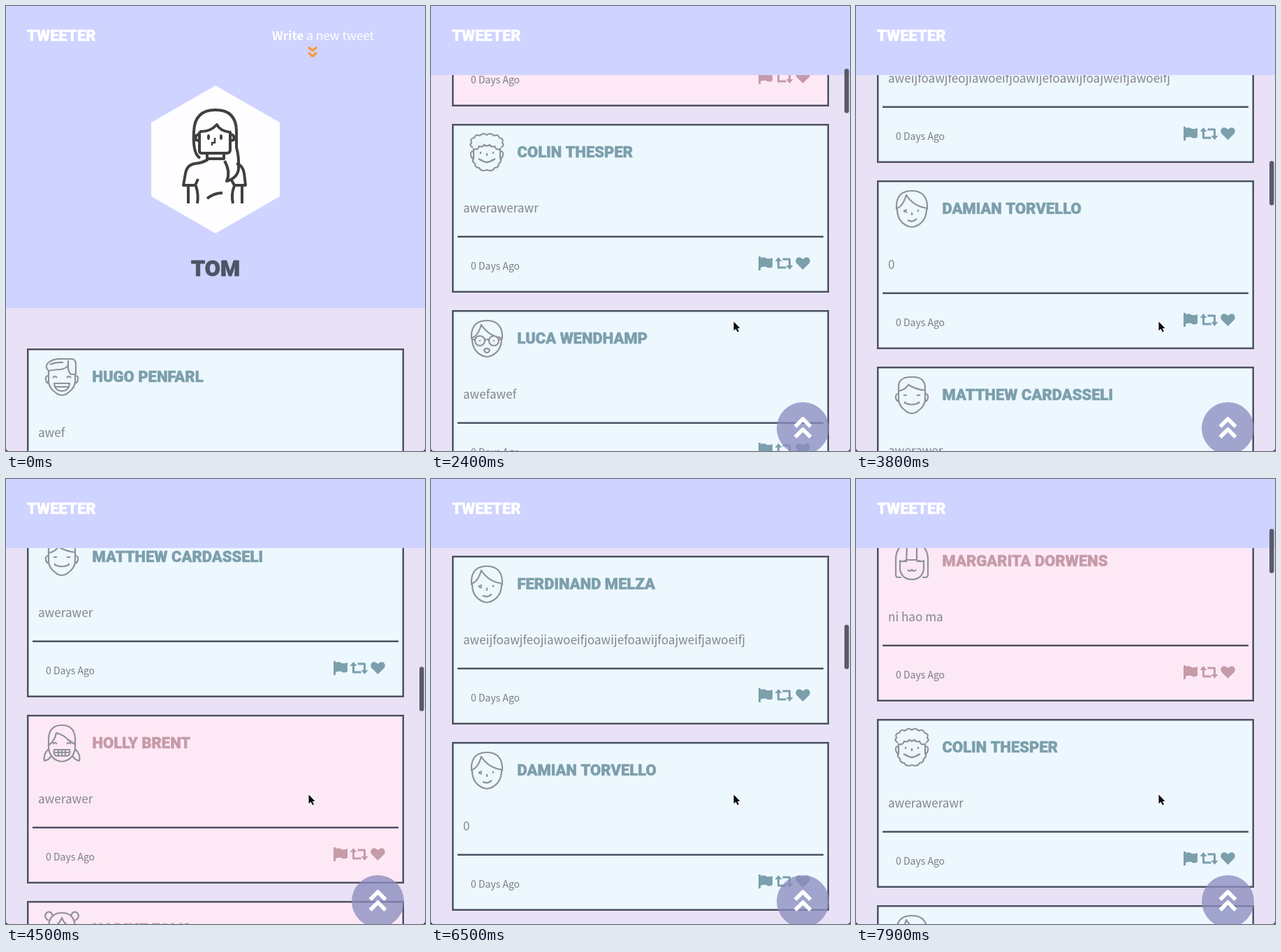
Animation, 600 px wide and 638 px high, one loop 8000 ms. Source, as an HTML page with a canvas:

```html
<!DOCTYPE html>
<html lang="en">
<head>
<meta charset="utf-8">
<title>Tweeter</title>
<style>
html, body { margin: 0; width: 100%; height: 100%; overflow: hidden; background: #e9e1f5; }
canvas { display: block; width: 600px; height: 638px; }
</style>
</head>
<body>
<canvas id="stage"></canvas>
<script>
const W = 600, H = 638, LOOP = 8000, STEP = 100;
const NAV = 99, HERO = 433, FIRST = 491, PITCH = 267, CARD_H = 242;
const canvas = document.getElementById('stage');
const ctx = canvas.getContext('2d');
const dpr = window.devicePixelRatio || 1;
canvas.width = W * dpr;
canvas.height = H * dpr;

const DISPLAY = 'Roboto, "Open Sans", sans-serif';
const BODY = '"Noto Sans CJK JP", "Noto Sans CJK SC", "Noto Sans CJK", "Open Sans", sans-serif';
const INK = '#4c5262';
const BLUE = { fill: '#edf7fe', main: '#7c9fac' };
const PINK = { fill: '#fde9f5', main: '#c69ba8' };

const cards = [
  ['HUGO PENFARL', 'awef', BLUE, 'laugh'],
  ['MARGARITA DORWENS', 'ni hao ma', PINK, 'bob'],
  ['COLIN THESPER', 'awerawerawr', BLUE, 'curly'],
  ['LUCA WENDHAMP', 'awefawef', BLUE, 'glasses'],
  ['ROGER TAMWELL', 'awefawef', BLUE, 'smirk'],
  ['MONICA VELDA', 'awefawefawef', PINK, 'pigtails'],
  ['FERDINAND MELZA', 'aweijfoawjfeojiawoeifjoawijefoawijfoajweifjawoeifj', BLUE, 'wink'],
  ['DAMIAN TORVELLO', '0', BLUE, 'wink'],
  ['MATTHEW CARDASSELI', 'awerawer', BLUE, 'smirk'],
  ['HOLLY BRENT', 'awerawer', PINK, 'pigtails'],
  ['NADINE FOLK', 'awerawer', PINK, 'buns']
];

// Face parts, drawn around the middle of the avatar
const JAW = 'M-19 -5V7Q-18 14 -13 19L-7 24Q0 28 7 24L13 19Q18 14 19 7V-5';
const EARS = 'M-19 -2Q-24 -2 -23 4Q-22 9 -18 9M19 -2Q24 -2 23 4Q22 9 18 9';
const HAPPY = 'M-13 1Q-10 -3 -7 1M7 1Q10 -3 13 1';
const SIDE = 'M-22 1V-7Q-20 -26 0 -26Q20 -26 22 -6V1M-22 -1Q-13 -3 -8 -20Q2 -4 22 -1';
const OVAL = 'M-21 0Q-21 16 -9 23Q0 29 9 23Q21 16 21 0';
const GRIN = 'M-11 9H11Q13 18 6 18H-6Q-13 18 -11 9ZM-10 13H10M-5 9V18M0 9V18M5 9V18';
const FRINGE = 'M-18 2Q-10 -4 -8 -15Q3 -12 9 -5Q14 -2 18 1';
const EYE = 'M-9 -1V2M9 -1V2';

const faces = {
  laugh: JAW + EARS + HAPPY +
    'M-19 -4V-9Q-25 -15 -20 -20Q-13 -27 2 -26H15Q20 -25 20 -18V-4' +
    'M-19 -9Q-8 -11 -2 -11Q6 -12 9 -17M9 -24V-12Q10 -6 13 -4H19M-17 -18Q-8 -22 2 -21' +
    'M-11 9H11Q10 20 0 20Q-10 20 -11 9ZM-10 14H10',
  bob: 'M-15 23H-20Q-23 23 -23 19V-4Q-22 -26 0 -26Q22 -26 23 -4V19Q23 23 20 23H15' +
    'M-17 -2V12Q-14 26 0 26Q14 26 17 12V-2M-17 0H-8L-7 -22M-7 -2H7L7 -22M8 0H17' +
    HAPPY + 'M-6 12Q-3 16 0 12Q3 16 6 12',
  curly: 'M-20 -7Q-26 -10 -22 -14Q-25 -20 -18 -21Q-16 -27 -10 -24Q-5 -29 0 -25Q5 -29 10 -24Q16 -27 18 -21Q25 -20 22 -14Q26 -10 20 -7' +
    'M-18 -5Q-13 -3 -11 -9Q-6 -7 -4 -11Q0 -8 4 -11Q6 -7 11 -9Q13 -3 18 -5' +
    'M-19 -6V7Q-22 13 -17 16Q-17 22 -11 22Q-8 28 0 25Q8 28 11 22Q17 22 17 16Q22 13 19 7V-6' +
    EARS + EYE + 'M-9 10Q0 18 9 10M-12 9L-7 12M12 9L7 12M0 1V5',
  glasses: SIDE + OVAL + 'M-17 3a7 7 0 1 0 14 0a7 7 0 1 0 -14 0M3 3a7 7 0 1 0 14 0a7 7 0 1 0 -14 0' +
    'M-3 2Q0 0 3 2M-21 1H-17M17 1H21M-10 2V4M10 2V4M-4 16Q0 12 4 16Q3 20 0 20Q-3 20 -4 16Z',
  pigtails: 'M-19 8V-7Q-18 -26 0 -26Q18 -26 19 -7V8Q15 25 0 26Q-15 25 -19 8' + FRINGE + HAPPY + GRIN +
    'M-19 8Q-27 16 -25 25Q-18 24 -15 17M19 8Q27 16 25 25Q18 24 15 17',
  wink: SIDE + OVAL + 'M-12 3L-7 1M-12 3L-7 5M9 1V4M0 5V9M-6 16Q1 20 7 14',
  smirk: JAW + EARS + 'M-19 -4V-10Q-20 -26 -2 -26H4Q19 -25 19 -10V-4M-19 -6Q-9 -8 -5 -15Q6 -8 19 -7' +
    'M-12 0H-7M7 0H12M-10 11Q0 16 10 11M-10 9V12M10 9V12',
  buns: JAW + 'M-19 -4Q-18 -24 0 -24Q18 -24 19 -4M-18 -2Q-4 -5 0 -17Q4 -5 18 -2' +
    'M-13 -20Q-16 -28 -22 -24Q-27 -18 -19 -13M13 -20Q16 -28 22 -24Q27 -18 19 -13' + EYE + 'M-7 12Q0 18 7 12'
};

const portrait = 'M278 218Q267 212 269 180Q270 149 300 149Q330 149 330 180V203Q334 216 333 234Q331 247 316 251Q322 238 313 222' +
  'M277 180V208Q277 211 281 211H316Q321 211 321 206V181Q306 179 302 170Q292 181 277 180' +
  'M276 184Q270 185 272 192L276 193M322 184Q328 185 326 192L322 193' +
  'M288 211V219H312V211M289 220Q282 225 270 226Q259 228 257 240L254 257H271L275 248' +
  'M330 226Q339 228 341 240L343 257H327L322 248' +
  'M261 258V283M272 258Q276 270 274 283M338 258V283M327 258Q322 270 325 283' +
  'M288 276Q298 268 310 268';

const flag = 'M-11 -10H-8V-8Q-3 -10 1 -7Q5 -6 9 -8V5Q4 8 0 5Q-4 4 -8 6V10H-11Z';
const heart = 'M0 9L-9 0Q-12 -5 -8 -8Q-4 -10 0 -6Q4 -10 8 -8Q12 -5 9 0Z';
const repost = 'M-8 -6V6H3M-2 -6H8V6';
const repostTips = 'M-13 -3H-3L-8 -9ZM3 3H13L8 9Z';

// Scroll position over time
const keys = [[0, 0], [900, 192], [1200, 325], [1800, 590], [2400, 856], [3200, 1626],
  [4500, 2556], [5000, 2690], [6500, 1983], [7900, 681]];

function secant(i) {
  return (keys[i + 1][1] - keys[i][1]) / (keys[i + 1][0] - keys[i][0]);
}

function slope(i) {
  if (i === 0) return secant(0);
  if (i === keys.length - 1) return secant(i - 1);
  const a = secant(i - 1), b = secant(i);
  return a * b < 0 ? 0 : (a + b) / 2;
}

function scrollAt(t) {
  let i = 0;
  while (i < keys.length - 2 && t >= keys[i + 1][0]) i++;
  const [t0, a] = keys[i], [t1, b] = keys[i + 1];
  const d = t1 - t0, u = (t - t0) / d, v = 1 - u;
  return a * v * v * (1 + 2 * u) + b * u * u * (3 - 2 * u) +
    d * u * v * (slope(i) * v - slope(i + 1) * u);
}

function rect(x, y, w, h, color) {
  ctx.fillStyle = color;
  ctx.fillRect(x, y, w, h);
}

function text(str, x, y, font, color, align = 'left') {
  ctx.font = font;
  ctx.textAlign = align;
  ctx.fillStyle = color;
  ctx.fillText(str, x, y);
}

function heavy(str, x, y, size, color, align = 'left') {
  text(str, x, y, `900 ${size}px ${DISPLAY}`, color, align);
  ctx.strokeStyle = color;
  ctx.lineWidth = size / 40;
  ctx.strokeText(str, x, y);
}

function line(path, color, width, x = 0, y = 0) {
  ctx.save();
  ctx.translate(x, y);
  ctx.strokeStyle = color;
  ctx.lineWidth = width;
  ctx.stroke(new Path2D(path));
  ctx.restore();
}

function shape(path, color, x = 0, y = 0) {
  ctx.save();
  ctx.translate(x, y);
  ctx.fillStyle = color;
  ctx.fill(new Path2D(path));
  ctx.restore();
}

function drawHero(s) {
  rect(0, 0, W, HERO - s, '#cfd3ff');
  ctx.save();
  ctx.translate(0, -s);
  shape('M300 114L392 167V273L300 326L208 273V167Z', '#fefdff');
  line(portrait, '#41403f', 4);
  for (const x of [290, 308]) {
    ctx.beginPath();
    ctx.ellipse(x, 188, 2, 4, 0, 0, Math.PI * 2);
    ctx.fillStyle = '#41403f';
    ctx.fill();
  }
  line('M299 189V196H295V200', '#41403f', 2.5);
  heavy('TOM', 300, 387, 32, '#4c5562', 'center');
  ctx.restore();
}

function drawCard([name, body, tone, face], y) {
  rect(30, y, 540, CARD_H, INK);
  rect(32.5, y + 2.5, 535, CARD_H - 5, tone.fill);
  line(faces[face], '#8f9298', 2.2, 80, y + 41);
  heavy(name, 123.5, y + 48, 22, tone.main);
  text(body, 46, y + 127, `300 17.1px ${BODY}`, '#85858e');
  rect(38, y + 160.5, 524, 2.5, INK);
  text('0 Days Ago', 57, y + 208.5, `300 14px ${BODY}`, '#7c7d86');
  const iy = y + 200;
  shape(flag, tone.main, 480, iy);
  line(repost, tone.main, 3, 505.5, iy);
  shape(repostTips, tone.main, 505.5, iy);
  shape(heart, tone.main, 532.5, iy);
}

function drawNav(atTop) {
  rect(0, 0, W, NAV, '#cfd3ff');
  heavy('TWEETER', 30, 49.5, 22, '#fff');
  if (!atTop) return;
  text('Write', 381, 49, `700 17.2px ${BODY}`, '#fff');
  const w = ctx.measureText('Write').width;
  text(' a new tweet', 381 + w, 49, `300 17.2px ${BODY}`, '#fff');
  line('M433 59L439 64L445 59M433 67L439 72L445 67', '#f59a3d', 3.4);
}

function drawUpButton() {
  ctx.beginPath();
  ctx.arc(532.5, 605.5, 37.5, 0, Math.PI * 2);
  ctx.fillStyle = 'rgba(138,140,190,0.77)';
  ctx.fill();
  line('M521.5 603L532.5 592L543.5 603M521.5 618L532.5 607L543.5 618', '#fff', 5.5);
}

function drawPointer(s) {
  const y = 34 + (s - 325) * 0.1055;
  ctx.fillStyle = '#595a68';
  ctx.beginPath();
  ctx.roundRect(592, y < 2 ? 2 : y, 6.5, 63.5, 3.2);
  ctx.fill();
  const arrow = 'M433.5 452.5V465.5L436.5 462.8L438.8 467.6L441 466.6L438.8 461.9H442.6Z';
  line(arrow, '#fff', 2);
  shape(arrow, '#0b0b0d');
}

function draw(t) {
  const s = Math.round(scrollAt(t));
  const atTop = s < HERO - NAV;
  ctx.setTransform(dpr, 0, 0, dpr, 0, 0);
  ctx.lineJoin = 'round';
  rect(0, 0, W, H, '#e9e1f5');
  if (s < HERO) drawHero(s);
  cards.forEach((card, i) => {
    const y = FIRST + i * PITCH - s;
    if (y < H && y + CARD_H > NAV) drawCard(card, y);
  });
  drawNav(atTop);
  if (!atTop) drawUpButton();
  if (t >= STEP) drawPointer(s);
  shape('M0 634Q0 638 4 638H0ZM600 634Q600 638 596 638H600Z', '#111');
}

const start = performance.now();
function tick() {
  const t = (performance.now() - start) % LOOP;
  draw(Math.floor(t / STEP) * STEP);
  requestAnimationFrame(tick);
}
tick();
</script>
</body>
</html>
```
